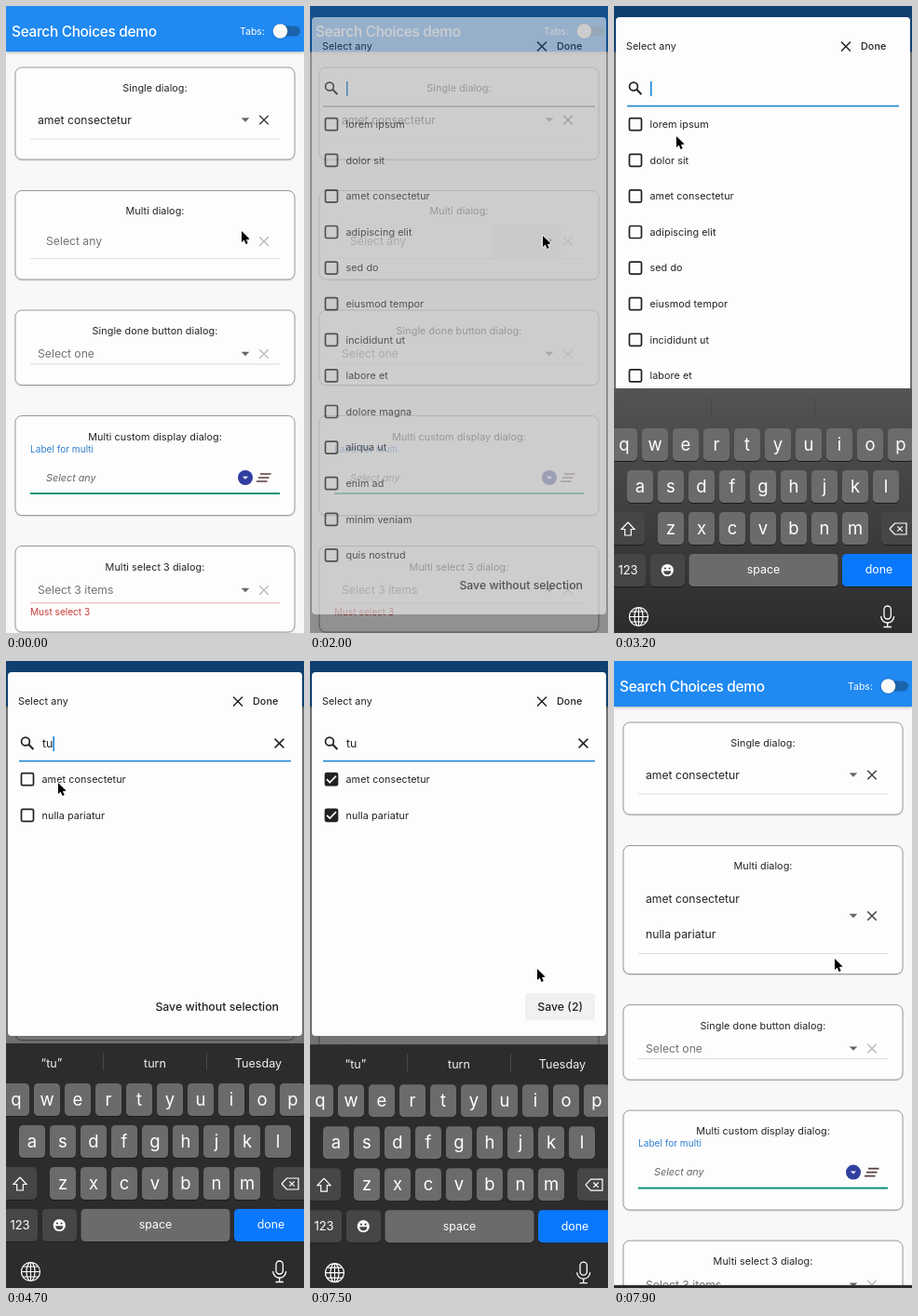
An HTML page with a canvas for the animation above (8 s loop, 320 px wide and 674 px high).

```html
<!DOCTYPE html>
<html lang="en">
<head>
<meta charset="utf-8">
<title>Search Choices demo</title>
<style>
html, body { margin: 0; width: 100%; height: 100%; overflow: hidden; background: #f9f7f9; }
canvas { display: block; width: 320px; height: 674px; }
</style>
</head>
<body>
<canvas id="stage"></canvas>
<script>
const W = 320, H = 674, LOOP = 8000;
const canvas = document.getElementById('stage');
const c = canvas.getContext('2d');
const dpr = window.devicePixelRatio || 1;
canvas.width = W * dpr;
canvas.height = H * dpr;

const FONT = 'Inter, Roboto, sans-serif';
const INK = '#222', HINT = '#737373';
const ITEMS = ['lorem ipsum', 'dolor sit', 'amet consectetur', 'adipiscing elit', 'sed do',
  'eiusmod tempor', 'incididunt ut', 'labore et', 'dolore magna', 'aliqua ut', 'enim ad',
  'minim veniam', 'quis nostrud', 'nulla pariatur'];

// Moments of the story, in ms
const OPEN = 1920, KEYS_IN = 2850, SHRINK = 3220, TYPE_T = 4100, TYPE_U = 4550;
const CHECK = { 'amet consectetur': 5050, 'nulla pariatur': 5950 };
const SAVE = 7400, CLOSE = 7510;
const BLINKS = [1950, 2450, 2900, TYPE_T, TYPE_U];

// Pointer path: time, x, y
const PATH = [[0, 253, 243], [900, 253, 243], [1700, 250, 248], [2080, 250, 248], [2480, 79, 153],
  [2650, 79, 153], [3150, 67, 141], [3700, 67, 141], [4500, 56, 132], [5200, 56, 132],
  [5700, 50, 163], [6400, 50, 163], [7200, 247, 366], [7400, 247, 366], [7500, 244, 332],
  [7800, 237, 321], [8000, 237, 321]];

const lerp = (a, b, k) => a + (b - a) * k;
const prog = (t, from, dur) => Math.min(1, Math.max(0, (t - from) / dur));
const easeOut = (k, n) => 1 - Math.pow(1 - k, n);
const smooth = k => k * k * (3 - 2 * k);

function text(s, x, y, size, color = INK, o = {}) {
  c.font = `${o.italic ? 'italic ' : ''}${o.weight || 400} ${size}px ${FONT}`;
  c.letterSpacing = (o.gap || 0) + 'px';
  c.textAlign = o.align || 'left';
  c.fillStyle = color;
  c.fillText(s, x, y + size * 0.36);
}

function box(x, y, w, h, r, fill, stroke, lw = 1) {
  c.beginPath();
  c.roundRect(x, y, w, h, r);
  if (fill) { c.fillStyle = fill; c.fill(); }
  if (stroke) { c.strokeStyle = stroke; c.lineWidth = lw; c.stroke(); }
}

function disc(x, y, r, fill) {
  c.beginPath();
  c.arc(x, y, r, 0, 7);
  c.fillStyle = fill;
  c.fill();
}

function rect(x, y, w, h, fill) {
  c.fillStyle = fill;
  c.fillRect(x, y, w, h);
}

// Draws polylines, each a flat list of coordinates
function lines(color, lw, ...paths) {
  c.beginPath();
  for (const p of paths) {
    c.moveTo(p[0], p[1]);
    for (let i = 2; i < p.length; i += 2) c.lineTo(p[i], p[i + 1]);
  }
  c.strokeStyle = color;
  c.lineWidth = lw;
  c.stroke();
}

const cross = (x, y, r, color, lw = 1.5) =>
  lines(color, lw, [x - r, y - r, x + r, y + r], [x + r, y - r, x - r, y + r]);

function arrow(x, y, r, color) {
  c.beginPath();
  c.moveTo(x - r, y - r / 2);
  c.lineTo(x + r, y - r / 2);
  c.lineTo(x, y + r / 2);
  c.fillStyle = color;
  c.fill();
}

function card(top, bottom, title, titleY) {
  c.save();
  c.shadowColor = 'rgba(0,0,0,.18)';
  c.shadowBlur = 2;
  c.shadowOffsetY = 1;
  box(10, top, 300, bottom - top, 7, '#fefdfe');
  c.restore();
  box(10, top, 300, bottom - top, 7, null, '#98979a');
  text(title, 160, titleY, 10.8, INK, { align: 'center', gap: 0.06 });
}

function picker(y, active) {
  arrow(257, y, 4.3, '#666');
  cross(277, y, 4.8, active ? '#444' : '#bdbcbe');
}

function home(t) {
  const saved = t >= SAVE;
  rect(0, 0, W, H, '#f9f7f9');

  card(66, 165, 'Single dialog:', 88);
  text('amet consectetur', 34, 122.5, 12.2, INK);
  picker(122.5, true);
  rect(26, 142.5, 268, 1, '#e0dfe1');

  card(198.5, saved ? 336.5 : 294, 'Multi dialog:', 220.5);
  if (t > 1900 && t < 2100) box(196, 235, 73, 35, 3, 'rgba(0,0,0,.05)');
  if (saved) {
    text('amet consectetur', 34, 255.5, 12.2);
    text('nulla pariatur', 34, 294, 12.2);
    picker(274, true);
    rect(26, 314, 268, 1, '#e0dfe1');
  } else {
    text('Select any', 43, 253, 12.2, HINT);
    picker(253, false);
    rect(26, 271, 268, 1, '#e0dfe1');
  }

  c.save();
  if (saved) c.translate(0, 42.6);
  card(327, 407.5, 'Single done button dialog:', 349.5);
  text('Select one', 34, 374, 12.2, HINT);
  picker(374, false);
  rect(26, 384.5, 268, 1, '#dddcde');

  card(440.5, 547.5, 'Multi custom display dialog:', 463);
  text('Label for multi', 26, 476, 10.1, '#2f7fd0');
  text('Select any', 43, 507, 10.8, '#666', { italic: true });
  disc(257, 507, 8, '#303f9f');
  arrow(257, 507.3, 3, '#fff');
  lines('#5a3c3c', 1.6, [273, 503, 284.5, 503], [271, 507, 282.5, 507], [269, 511, 280.5, 511]);
  rect(26, 523, 268, 2, '#0b9478');

  card(580.5, 673, 'Multi select 3 dialog:', 603);
  text('Select 3 items', 34, 628, 12.2, HINT);
  picker(628, false);
  rect(26, 641, 268, 1.4, '#f6c3c4');
  text('Must select 3', 26, 651.5, 10.1, '#c93a36');
  c.restore();

  c.save();
  c.shadowColor = 'rgba(0,0,0,.3)';
  c.shadowBlur = 3;
  c.shadowOffsetY = 1;
  rect(0, 0, W, 49, '#2089f2');
  c.restore();
  text('Search Choices demo', 6, 27, 15.4, '#fff', { weight: 500, gap: -0.3 });
  text('Tabs:', 251, 27, 10.5, '#fff');
  box(289, 21.5, 27, 11, 5.5, '#1a64ab');
  c.save();
  c.shadowColor = 'rgba(0,0,0,.35)';
  c.shadowBlur = 2;
  disc(294.5, 27, 7.8, '#fafafa');
  c.restore();
}

function checkbox(x, y, on) {
  box(x - 6.5, y - 6.5, 13, 13, 1.5, on ? INK : null, INK, 1.7);
  if (on) lines('#fff', 1.7, [x - 5, y, x - 1.7, y + 3.3, x + 5, y - 3.6]);
}

function dialog(t) {
  const query = t >= TYPE_U ? 'tu' : t >= TYPE_T ? 't' : '';
  const bottom = lerp(654, 403, easeOut(prog(t, SHRINK, 80), 2));
  box(2, 12, 316, bottom - 12, 4, '#fefdfe');
  text('Select any', 13, 43.5, 10.8, INK, { gap: 0.06 });
  cross(249, 43.5, 5, INK);
  text('Done', 265, 43.5, 10.8, INK, { weight: 500, gap: 0.05 });

  c.beginPath();
  c.arc(21, 86.5, 4.4, 0, 7);
  c.strokeStyle = INK;
  c.lineWidth = 1.7;
  c.stroke();
  lines(INK, 2, [24.3, 89.8, 29.5, 95]);
  text(query, 39, 88.5, 12.4);
  const caret = 39 + (query ? c.measureText(query).width : 0);
  const since = t - BLINKS.filter(b => b <= t).pop();
  if (since % 1000 < 500) rect(caret, 81, 1.6, 16, '#1c86d1');
  if (query) cross(293.5, 88.5, 4.9, INK);
  if (t < 2080) rect(14, 107.5, 292, 1, '#858586');
  else rect(14, 106.7, 292, 1.7, '#2589cc');

  c.save();
  c.beginPath();
  c.rect(2, 109, 316, bottom - 51 - 109);
  c.clip();
  ITEMS.filter(s => s.includes(query)).forEach((s, i) => {
    const y = 127.2 + i * 38.6;
    checkbox(23, y, t >= CHECK[s]);
    text(s, 38.5, y, 10.8, INK, { gap: 0.06 });
  });
  c.restore();

  const count = Object.values(CHECK).filter(at => t >= at).length;
  if (t >= SAVE) box(231, bottom - 46, 75, 29, 2, '#f1f0f2');
  text(count ? `Save (${count})` : 'Save without selection', 293, bottom - 31.3, 12.3, INK,
    { align: 'right', weight: 500 });
}

function key(x, y, w, label, size, fill = '#6b6b6d') {
  box(x, y + 1, w, 35, 4.5, '#1d1d1f');
  box(x, y, w, 35, 4.5, fill);
  if (label) text(label, x + w / 2, y + 17, size, '#fff', { align: 'center' });
}

function keyRow(letters, x, y) {
  [...letters].forEach((l, i) => key(x + i * 33 - 14, y, 28, l, 18.5));
}

function keyboard(t) {
  const down = 263 * (t < 5000 ? 1 - easeOut(prog(t, KEYS_IN, 330), 3) : easeOut(prog(t, 7500, 450), 2));
  if (down >= 263) return;
  const dark = '#464648';
  c.save();
  c.translate(0, down);
  rect(0, 411, W, 263, '#2c2c2e');
  const glow = 1 - prog(t, 3200, 120);
  if (glow) {
    const g = c.createLinearGradient(0, 411, 0, 674);
    g.addColorStop(0, `rgba(255,255,255,${0.19 * glow})`);
    g.addColorStop(1, 'rgba(255,255,255,0)');
    rect(0, 411, W, 263, g);
  }
  rect(104, 421, 1, 19, '#47474a');
  rect(215, 421, 1, 19, '#47474a');
  const words = t >= TYPE_U ? ['“tu”', 'turn', 'Tuesday'] : t >= TYPE_T ? ['“t”'] : [];
  words.forEach((w, i) => text(w, 49 + i * 111, 432, 12.6, '#f2f2f2', { align: 'center' }));

  keyRow('qwertyuiop', 11, 454);
  keyRow('asdfghjkl', 28, 499);
  keyRow('zxcvbnm', 61, 544);
  key(-5, 544, 38, '', 0, dark);
  lines('#fff', 1.2, [15, 555, 8, 562.5, 11.7, 562.5, 11.7, 569, 18.3, 569, 18.3, 562.5, 22, 562.5, 15, 555]);
  key(287, 544, 40, '', 0, dark);
  lines('#fff', 1.2, [296, 562, 301.5, 556, 314, 556, 314, 568, 301.5, 568, 296, 562]);
  cross(307, 562, 2.7, '#fff', 1.2);
  key(-5, 589, 39, '', 0, dark);
  text('123', 15, 606.5, 13, '#fff', { align: 'center' });
  key(39, 589, 37, '', 0, dark);
  key(80.5, 589, 160, 'space', 12.4);
  key(245, 589, 80, '', 0, '#0a78fe');
  text('done', 284.5, 606, 12.4, '#fff', { align: 'center' });

  // Smiley
  disc(57.3, 606.5, 6.6, '#fff');
  disc(55, 604.5, 1.1, dark);
  disc(59.6, 604.5, 1.1, dark);
  c.beginPath();
  c.arc(57.3, 607.2, 4, 0, Math.PI);
  c.fill();

  // Globe
  c.strokeStyle = '#fff';
  c.lineWidth = 1.2;
  c.beginPath();
  c.arc(26.5, 656.5, 10, 0, 7);
  c.moveTo(31, 656.5);
  c.ellipse(26.5, 656.5, 4.5, 10, 0, 0, 7);
  c.stroke();
  lines('#fff', 1.1, [16.5, 656.5, 36.5, 656.5], [26.5, 646.5, 26.5, 666.5],
    [18.5, 651, 34.5, 651], [18.5, 662, 34.5, 662]);

  // Microphone
  box(290, 645, 7.4, 14, 3.7, null, '#fff', 1.3);
  c.beginPath();
  c.arc(293.7, 656, 7, 0, Math.PI);
  c.stroke();
  lines('#fff', 1.3, [293.7, 663, 293.7, 667.5], [289.5, 667.5, 298, 667.5]);
  c.restore();
}

function pointer(t) {
  const i = PATH.findIndex(p => p[0] > t);
  const a = PATH[i - 1], b = PATH[i];
  const k = smooth(prog(t, a[0], b[0] - a[0]));
  c.save();
  c.translate(lerp(a[1], b[1], k), lerp(a[2], b[2], k) - 1);
  c.beginPath();
  [[0, 0], [0, 12], [2.7, 9.6], [4.6, 14], [6.7, 13.1], [4.9, 8.9], [8.6, 8.6]]
    .forEach(p => c.lineTo(...p));
  c.closePath();
  c.lineJoin = 'round';
  c.strokeStyle = '#fff';
  c.lineWidth = 1.4;
  c.stroke();
  c.fillStyle = '#000';
  c.fill();
  c.restore();
}

// The dialog is drawn on a layer so that it fades as one sheet
const layer = document.createElement('canvas');
layer.width = canvas.width;
layer.height = canvas.height;

function overlay(t) {
  const open = t < CLOSE ? prog(t, OPEN, 200) : 1 - prog(t, CLOSE, 150);
  if (!open) return;
  const shade = 0.54 * easeOut(open, 3), alpha = easeOut(open, 1.6);
  rect(0, 0, W, H, `rgba(0,0,0,${shade})`);
  if (alpha === 1) return dialog(t);
  const l = layer.getContext('2d');
  l.clearRect(0, 0, layer.width, layer.height);
  l.drawImage(canvas, 0, 0);
  dialog(t);
  c.globalAlpha = 1 - alpha;
  c.drawImage(layer, 0, 0, W, H);
  c.globalAlpha = 1;
}

function draw(t) {
  c.setTransform(dpr, 0, 0, dpr, 0, 0);
  home(t);
  overlay(t);
  keyboard(t);
  pointer(t);
}

const start = performance.now();
function tick() {
  draw((performance.now() - start) % LOOP);
  requestAnimationFrame(tick);
}
tick();
</script>
</body>
</html>
```
